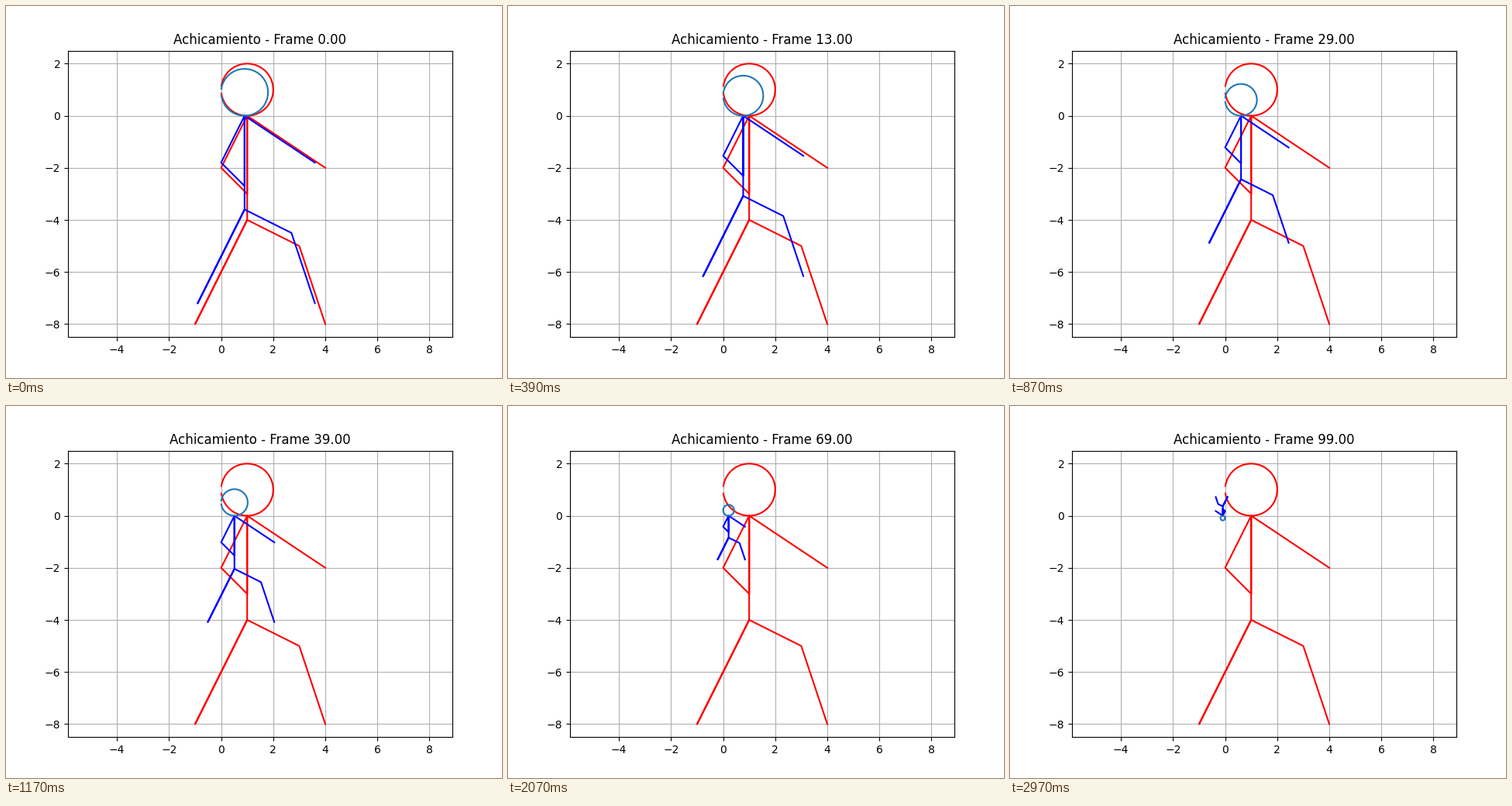
A matplotlib script for the animation above (3 s loop, 640 by 480 pixels).

```python
import numpy as np
import matplotlib.pyplot as plt
from matplotlib.animation import FuncAnimation

FRAMES = 100
INTERVAL = 30

# One continuous stroke: right arm, torso, left arm, hips and both legs
body = np.array([
    (4, -2), (1, 0), (1, -3), (0, -2), (1, 0), (1, -4),
    (-1, -8), (1, -4), (3, -5), (4, -8),
], dtype=float).T

# Head, left open where the angle runs out at +-3 rad
angle = np.linspace(-3, 3, 100)
head = np.array([1 + np.cos(angle), 1 + np.sin(angle)])

fig, ax = plt.subplots(figsize=(6.4, 4.8), dpi=100)
ax.plot(*body, color="red")
ax.plot(*head, color="red")
small_body, = ax.plot([], [], color="blue")
small_head, = ax.plot([], [], color="tab:blue")
title = ax.set_title("")
ax.grid(True)

# Equal units on both axes, centred on the large figure
half_width = 5.5 * (0.775 * 640) / (0.77 * 480)
ax.set_xlim(1.5 - half_width, 1.5 + half_width)
ax.set_ylim(-8.5, 2.5)


def update(i):
    scale = 0.9 - 0.01 * i
    small_body.set_data(*(scale * body))
    small_head.set_data(*(scale * head))
    title.set_text(f"Achicamiento - Frame {i:.2f}")
    return small_body, small_head, title


anim = FuncAnimation(fig, update, frames=FRAMES, interval=INTERVAL,
                     repeat=True, repeat_delay=0, blit=False)
plt.show()
```
